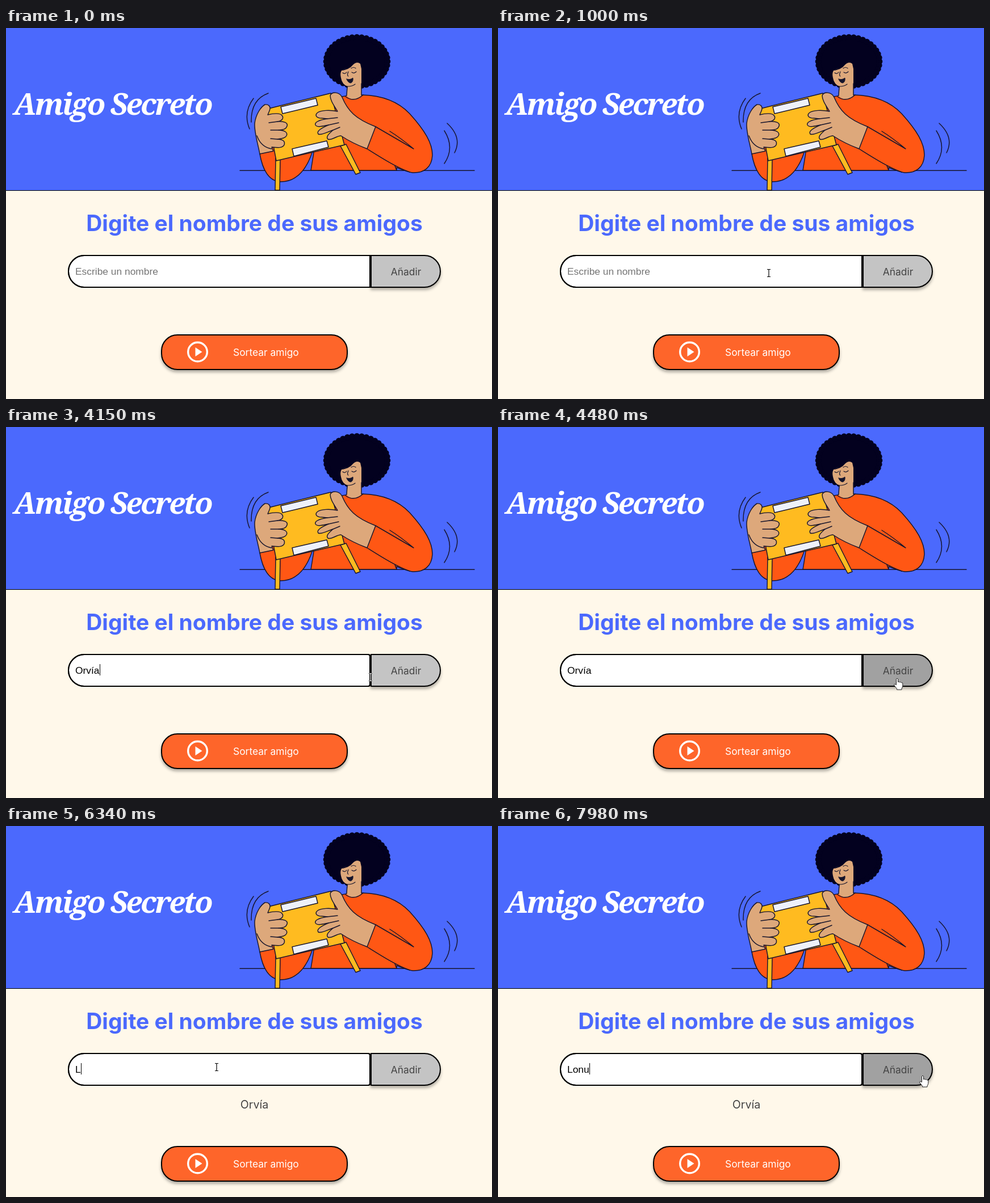
These frames come from a looping animation (856 px wide and 654 px high, 8000 ms). An HTML page:

```html
<!DOCTYPE html>
<html lang="es">
<head>
<meta charset="utf-8">
<title>Amigo Secreto</title>
<style>
  html, body { margin: 0; width: 100%; height: 100%; overflow: hidden; background: #fff8ea; }
  svg { display: block; }
  text { font-family: Inter, sans-serif; font-size: 17.4px; fill: #444; white-space: pre; }
  .title { font: italic 800 53px "Noto Serif", serif; letter-spacing: -2.9px; fill: #fff; }
  .heading { font-size: 39px; font-weight: 700; fill: #4b69fd; }
  .field { font-family: "Liberation Sans", Arial, sans-serif; }
  .ink { fill: none; stroke: #17152c; stroke-width: 1.45; stroke-linecap: round; stroke-linejoin: round; }
  .skin { fill: #dda87b; }
  .shirt { fill: #ff5714; }
  .wood { fill: #ffbb20; }
  .paper { fill: #eef1fa; }
  .edge { fill: none; stroke: #000; stroke-width: 2; }
</style>
</head>
<body>
<svg width="856" height="654" viewBox="0 0 856 654">
  <defs>
    <filter id="shadow" x="-10%" y="-20%" width="120%" height="160%">
      <feDropShadow dx="0" dy="4" stdDeviation="2.4" flood-color="#000" flood-opacity=".3"/>
    </filter>
  </defs>

  <rect width="856" height="654" fill="#fff8ea"/>
  <rect width="856" height="286" fill="#4b69fd"/>
  <text class="title" x="13.5" y="153">Amigo Secreto</text>

  <g class="ink">
    <path d="M412 251.3H825"/>
    <path d="M436 124Q417 149 429 178M462 115Q431 126 432 166M772 181Q791 211 772 239M777 168Q804 193 790 220"/>
    <!-- body -->
    <path class="shirt" d="M447 222C452 250 462 269 482 271C512 272 530 250 541 214L476 200Z"/>
    <path class="shirt" d="M537 251L546 195L575 122Q598 121 600 119L627 118C668 119 694 133 711 151C738 181 751 203 751 224C750 246 736 256 716 255C707 254 698 250 688 246V251Z"/>
    <path d="M636 213C660 228 688 246 711 254M688 251L685 243M651 174L718 213C706 203 692 192 676 182"/>
    <!-- head -->
    <g id="hair" fill="#03011f" stroke="none"><ellipse cx="618" cy="59" rx="56" ry="45"/></g>
    <path class="skin" stroke="none" d="M591 75Q605 73 611 65Q618 58 624 63L626 72V119Q613 132 600 120L602 103Q592 100 590 88Q588 80 591 75Z"/>
    <path d="M598 121Q613 132 629 118M601 103L600 119M626 98V118"/>
    <path stroke-width="1.2" d="M602 103Q610 103 615 99M594 74Q597 70 600 72M608 71Q612 68 616 71M593 79Q597 82 600 78M609 78Q613 81 617 77M603 77Q600 84 603 85"/>
    <path fill="#14142b" stroke-width="1" d="M600 90Q606 92 611 88Q612 95 607 97Q602 96 600 90Z"/>
    <!-- box -->
    <path class="wood" d="M589 208L599 205L624 255L616 258Z"/>
    <path class="wood" d="M475 230H483L482 286H474Z"/>
    <path class="wood" d="M459 143L572 115L596 206L476 234Z"/>
    <path class="paper" d="M484 139L546 124L549 136L487 151ZM504 213L565 199L568 210L507 226Z"/>
    <!-- hands -->
    <path class="skin" d="M447 222C444 205 437 184 438 168C440 152 449 139 456 135C463 134 467 139 464 146L461 153C472 150 483 150 486 154C490 159 486 164 478 165C490 164 497 167 495 173C493 179 486 180 480 180C490 180 497 184 494 190C491 195 484 195 478 196C488 196 492 200 490 206C487 212 478 211 468 210L471 217Z"/>
    <path d="M478 165L463 167M480 180L466 180M478 196L466 195M442 190Q449 210 468 213"/>
    <path class="skin" d="M651 174C615 160 602 146 592 122C587 112 574 112 571 119C571 128 578 137 584 147C570 144 555 145 549 149C543 154 547 159 556 159L566 160C552 162 543 166 545 171C548 176 558 173 568 171C556 176 546 182 550 187C556 190 568 182 576 180C568 187 563 192 567 196C573 199 582 190 590 190C602 198 615 205 636 213Z"/>
    <path d="M566 160L584 158M568 171L586 167M576 180L588 175"/>
  </g>
  <rect y="286" width="856" height="1" fill="#000"/>

  <text class="heading" x="437.5" y="358" text-anchor="middle">Digite el nombre de sus amigos</text>

  <path id="input" class="edge" style="fill:#fff"/>
  <g filter="url(#shadow)">
    <path id="add" class="edge" d="M643 401H737A28 28 0 0 1 737 457H643Z"/>
  </g>
  <path id="ring" class="edge"/>
  <text x="704.5" y="435.5" text-anchor="middle">Añadir</text>
  <text id="value" class="field" x="122" y="434.5"></text>
  <rect id="caret" y="418" width="1" height="20"/>

  <text id="friend" x="437.5" y="498" text-anchor="middle" style="font-size:19.6px">Orvía</text>

  <g id="draw">
    <rect id="drawFace" class="edge" x="274" y="541" width="327" height="61" rx="28" filter="url(#shadow)"/>
    <circle cx="337.5" cy="571" r="16.8" fill="none" stroke="#fff" stroke-width="3.4"/>
    <path d="M333.5 563L345.5 571L333.5 579Z" fill="#fff"/>
    <text x="400" y="578" style="fill:#fff">Sortear amigo</text>
  </g>

  <g id="pointer">
    <path id="arrow" d="M0 0V16.5L4 12.8L6.6 18.7L9 17.6L6.5 11.9H11.8Z" fill="#fff" stroke="#000"/>
    <path id="hand" d="M-1.5 9.5V1.2Q0 -1 1.5 1.2V6.5Q3.5 5.2 4.5 7Q6.5 5.8 7.4 7.8Q9.5 7 9.8 9.2V13.5Q9.5 16 8 18V20H-.5V18.3Q-3 15.5 -5.5 11.8Q-5 9 -1.5 11.5Z" fill="#fff" stroke="#222" stroke-linejoin="round"/>
  </g>
  <path id="beam" d="M-3 -6.5H-1Q0 -6.5 0 -5.5Q0 -6.5 1 -6.5H3M0 -5.5V5.5M-3 6.5H-1Q0 6.5 0 5.5Q0 6.5 1 6.5H3" fill="none" stroke="#fff" stroke-width="1.2" style="mix-blend-mode:difference"/>
</svg>
<script>
const LOOP = 8000, BLINK = 520, BLUR_AT = 4400, ADD_AT = 4530;
const $ = id => document.getElementById(id);
const show = (id, on) => $(id).setAttribute('display', on ? 'inline' : 'none');
const inside = (p, x0, y0, x1, y1) => p.x >= x0 && p.x <= x1 && p.y >= y0 && p.y <= y1;

// [time, field value]; null means the field has no focus
const typing = [
  [0, null], [1160, ''], [2160, 'O'], [2490, 'Or'], [2550, 'Orv'], [2890, 'Orví'], [3030, 'Orvía'],
  [ADD_AT, null], [5510, ''], [6340, 'L'], [6530, 'Lo'], [6740, 'Lon'], [6870, 'Lonu']
];

// [time, x, y] of the pointer
const route = [
  [270, 723, 650], [400, 660, 610], [540, 585, 575], [680, 530, 520], [820, 498, 472], [1000, 477, 432],
  [3890, 477, 432], [4150, 642, 441], [4290, 703, 444], [4600, 703, 442], [4660, 650, 436], [4730, 442, 424],
  [4860, 400, 417], [4990, 375, 414], [5210, 375, 414], [5340, 371, 425],
  [7560, 371, 425], [7720, 500, 431], [7850, 675, 437], [7980, 748, 440]
];

function pointerAt(t) {
  const i = route.findIndex(p => p[0] > t);
  if (i === 0) return null;
  const [t1, x1, y1] = i < 0 ? route.at(-1) : route[i];
  const [t0, x0, y0] = i < 0 ? route.at(-1) : route[i - 1];
  const k = t1 > t0 ? (t - t0) / (t1 - t0) : 1;
  return { x: x0 + (x1 - x0) * k, y: y0 + (y1 - y0) * k };
}

function fieldShape(r) {
  return `M138 401H${641 - r}q${r} 0 ${r} ${r}V${457 - r}q0 ${r} ${-r} ${r}H138A28 28 0 0 1 138 401Z`;
}

function drawHair() {
  const curls = 40;
  for (let i = 0; i < curls; i++) {
    const a = i / curls * 2 * Math.PI;
    const curl = document.createElementNS('http://www.w3.org/2000/svg', 'circle');
    curl.setAttribute('cx', 618 + 54 * Math.cos(a));
    curl.setAttribute('cy', 59 + 43 * Math.sin(a));
    curl.setAttribute('r', 5.3);
    $('hair').append(curl);
  }
}

function render(t) {
  const [since, value] = typing.findLast(e => e[0] <= t);
  const focused = value !== null && !(t >= BLUR_AT && t < ADD_AT);
  const added = t >= ADD_AT;
  const shift = added ? 24 : 0;

  $('value').textContent = value || 'Escribe un nombre';
  $('value').style.fill = value ? '#000' : '#757575';
  $('caret').setAttribute('x', Math.round(122 + (value ? $('value').getComputedTextLength() : 0)));
  show('caret', focused && (t - since) % (2 * BLINK) < BLINK);
  for (const id of ['input', 'ring']) $(id).setAttribute('d', fieldShape(focused ? 3 : 0));

  show('friend', added);
  $('draw').setAttribute('transform', `translate(0 ${shift})`);

  const p = pointerAt(t);
  const onAdd = !!p && inside(p, 643, 401, 765, 457);
  const onDraw = !!p && inside(p, 274, 541 + shift, 601, 602 + shift);
  const onField = !!p && inside(p, 110, 401, 643, 457);
  $('add').style.fill = onAdd ? '#a1a1a1' : '#c4c4c4';
  $('drawFace').style.fill = onDraw ? '#e55720' : '#fe652b';
  show('beam', onField);
  show('hand', onAdd || onDraw);
  show('arrow', p && !onAdd && !onDraw && !onField);
  if (p) {
    const place = `translate(${Math.round(p.x)} ${Math.round(p.y)})`;
    $('pointer').setAttribute('transform', place);
    $('beam').setAttribute('transform', place);
  }
}

drawHair();
const start = performance.now();
function tick() {
  render((performance.now() - start) % LOOP);
  requestAnimationFrame(tick);
}
tick();
</script>
</body>
</html>
```
